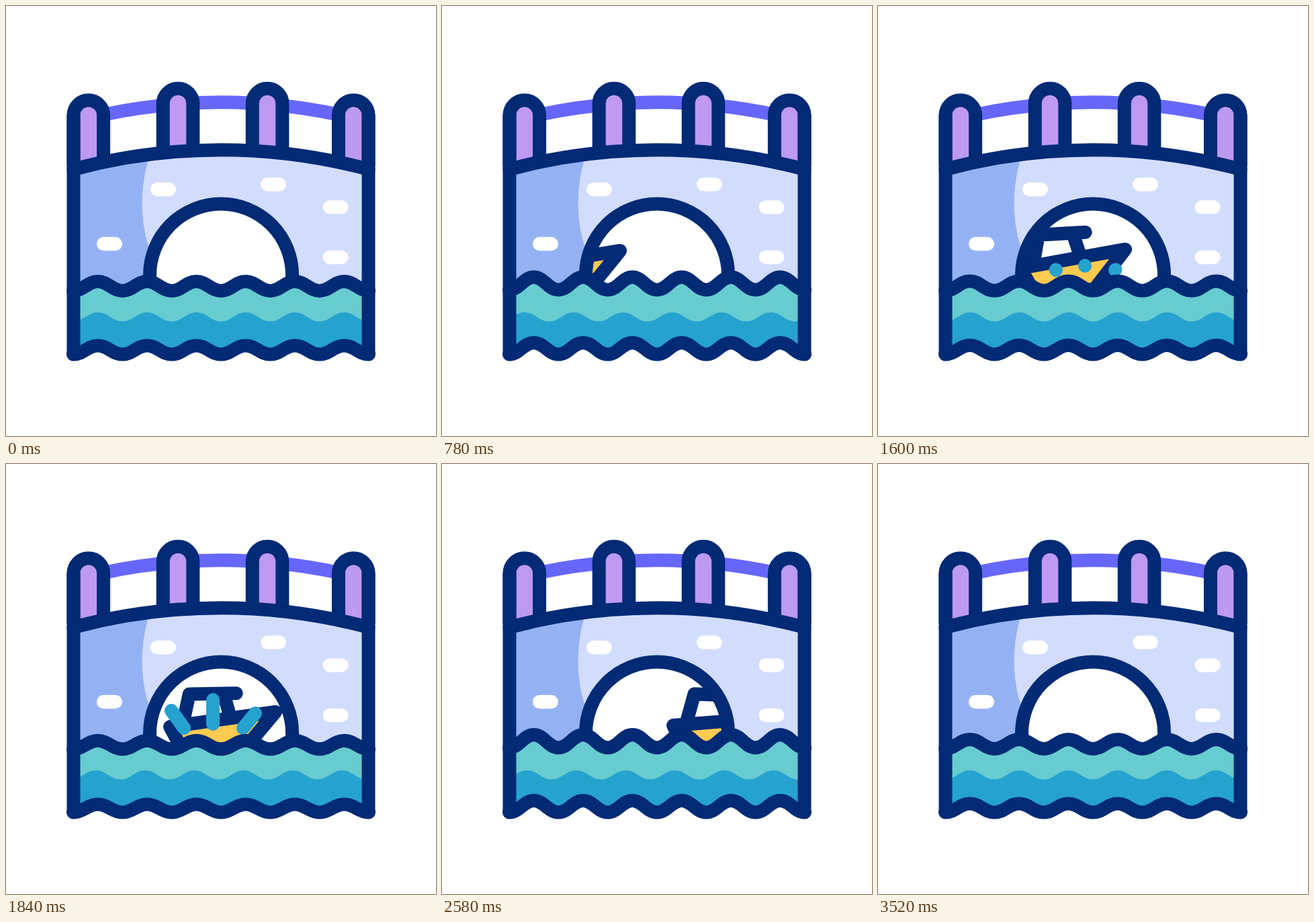
An HTML page for the animation above (3540 ms loop, 640x640 px).

```html
<!DOCTYPE html>
<html lang="en">
<head>
<meta charset="utf-8">
<title>Boat under a bridge</title>
<style>
  html, body { margin: 0; width: 100%; height: 100%; overflow: hidden; background: #fff; }
  svg { display: block; width: 100vw; height: 100vh; }
  .line { fill: none; stroke: #022a75; stroke-width: 20; stroke-linecap: round; stroke-linejoin: round; }
  .post { fill: #bd99f2; stroke-linecap: butt; }
  .rail { fill: none; stroke: #6766fb; stroke-width: 20; }
  .splash { fill: none; stroke: #26a2cf; stroke-width: 20; stroke-linecap: round; }
</style>
</head>
<body>
<svg viewBox="0 0 640 640">
  <defs>
    <clipPath id="arch"><path d="M214 430V400.5a106 106 0 0 1 212 0V430Z"/></clipPath>
    <clipPath id="wall"><path d="M100 243A849 849 0 0 1 540 243V425H100Z"/></clipPath>
  </defs>

  <path class="rail" d="M145 161.7A849 849 0 0 1 495 161.7"/>
  <g clip-path="url(#wall)">
    <path fill="#d2dcfd" d="M100 200H540V425H100Z"/>
    <path fill="#94b2f3" d="M100 200H221L211.500 230C200 270 199 315 212 357L225 425H100Z"/>
  </g>
  <g id="bricks" fill="#fff"></g>
  <path fill="#fff" d="M214 430V400.5a106 106 0 0 1 212 0V430Z"/>

  <g clip-path="url(#arch)">
    <g id="boat">
      <path class="line" d="M19 0L35 -44L104.500 -35.500M86 -37L91 0"/>
      <path class="line" style="fill:#ffca50" d="M0 0H158.500L103 50H18Z"/>
    </g>
    <g id="splashes"></g>
  </g>
  <path class="line" d="M214 414V400.5a106 106 0 0 1 212 0V414"/>

  <g id="posts"></g>
  <path class="line" d="M100.500 243A849 849 0 0 1 539.500 243"/>

  <path id="shallow" fill="#67ccd0"/>
  <path id="deep" fill="#26a2cf"/>
  <path id="surface" class="line"/>
  <path id="bed" class="line"/>
  <path class="line" d="M100.500 162V518M539.500 162V518"/>
</svg>
<script>
  const LOOP = 3540, LEFT = 100, RIGHT = 540, HALF = (RIGHT - LEFT) / 12;
  const $ = id => document.getElementById(id);

  function add(parent, tag, attrs) {
    const node = document.createElementNS("http://www.w3.org/2000/svg", tag);
    for (const key in attrs) node.setAttribute(key, attrs[key]);
    return $(parent).appendChild(node);
  }

  for (const [x, y] of [[234, 273], [398, 265.5], [490.5, 299.5], [154, 354], [490.5, 374]])
    add("bricks", "rect", { x: x - 19, y: y - 10.2, width: 38, height: 20.4, rx: 10.2 });

  for (const [x, y, base] of [[122.8, 162.5, 238], [256, 145, 217], [389, 145, 217], [517.2, 162.5, 238]])
    add("posts", "path", { class: "line post", d: `M${x - 22.3} ${base}V${y}a22.3 22.3 0 0 1 44.6 0V${base}` });

  const splashes = [[265, 393, 246, 367], [308, 387, 308, 351], [353, 393, 371, 371]]
    .map(ends => ({ ends, node: add("splashes", "path", { class: "splash" }) }));

  // Smooth curve through [time, value] pairs, at rest at both ends.
  function track(keys, t) {
    const last = keys.length - 1;
    if (t <= keys[0][0]) return keys[0][1];
    if (t >= keys[last][0]) return keys[last][1];
    const i = keys.findIndex(k => k[0] > t) - 1;
    const slope = n => n < 1 || n >= last ? 0
      : (keys[n + 1][1] - keys[n - 1][1]) / (keys[n + 1][0] - keys[n - 1][0]);
    const [t0, a] = keys[i], [t1, b] = keys[i + 1];
    const d = t1 - t0, p = (t - t0) / d, q = 1 - p;
    return a * (1 + 2 * p) * q * q + b * p * p * (3 - 2 * p)
      + d * p * q * (slope(i) * q - slope(i + 1) * p);
  }

  const boatX = [[200, 40], [780, 108.5], [1360, 180.5], [1840, 244], [2100, 279], [2580, 344], [3420, 455]];
  const boatY = [[200, 389], [780, 389], [1360, 389.6], [1840, 391], [2100, 392], [2580, 389], [3420, 392]];
  const tilt = [[200, -5], [780, -9], [1360, -11.5], [1840, -8], [2100, -5.3], [2580, -4.6], [3420, -8]];
  const swell = [[200, 0.4], [780, 1.9], [1360, 1.2], [1840, 0], [2100, 0.9], [2580, 2], [3420, 0.4]];
  const drift = [[200, 0], [780, -14], [1360, 3], [1840, -3], [2100, 5], [2580, -10], [3420, 0]];

  // Waves start and end in a trough.
  function wave(crest, trough, from = LEFT, halves = 12) {
    const pull = HALF * 0.42;
    let d = `M${from} ${trough}`;
    for (let i = 0; i < halves; i++) {
      const x = from + i * HALF, a = i % 2 ? crest : trough, b = i % 2 ? trough : crest;
      d += `C${x + pull} ${a} ${x + HALF - pull} ${b} ${x + HALF} ${b}`;
    }
    return d;
  }

  const mask = add("splashes", "clipPath", { id: "water" });
  const maskPath = document.createElementNS("http://www.w3.org/2000/svg", "path");
  mask.appendChild(maskPath);
  $("deep").setAttribute("clip-path", "url(#water)");

  const ease = p => { p = Math.min(1, Math.max(0, p)); return p * p * (3 - 2 * p); };

  function draw(t) {
    const s = track(swell, t);
    const top = wave(411.7 - 4.3 * s, 424.3 - s);
    const crest = 506.5 - 2.8 * s, floor = wave(crest, 518.5);
    const body = `${floor}V400H${LEFT}Z`;

    $("surface").setAttribute("d", top);
    $("bed").setAttribute("d", floor);
    $("shallow").setAttribute("d", `${top}V${crest + 6}H${LEFT}Z`);
    maskPath.setAttribute("d", body);
    const start = LEFT - 2 * HALF + track(drift, t);
    $("deep").setAttribute("d", `${wave(456, 469.5, start, 16)}V530H${start}Z`);

    $("boat").setAttribute("transform",
      `translate(${track(boatX, t)} ${track(boatY, t)}) rotate(${track(tilt, t)})`);

    const head = ease((t - 1580) / 260), tail = ease((t - 1840) / 220);
    for (const { ends: [x0, y0, x1, y1], node } of splashes) {
      const at = p => `${x0 + (x1 - x0) * p} ${y0 + (y1 - y0) * p}`;
      node.setAttribute("d", `M${at(tail)}L${at(head)}`);
      node.style.display = head > 0 && tail < 1 ? "" : "none";
    }
  }

  function tick() {
    draw(performance.now() % LOOP);
    requestAnimationFrame(tick);
  }
  tick();
</script>
</body>
</html>
```
